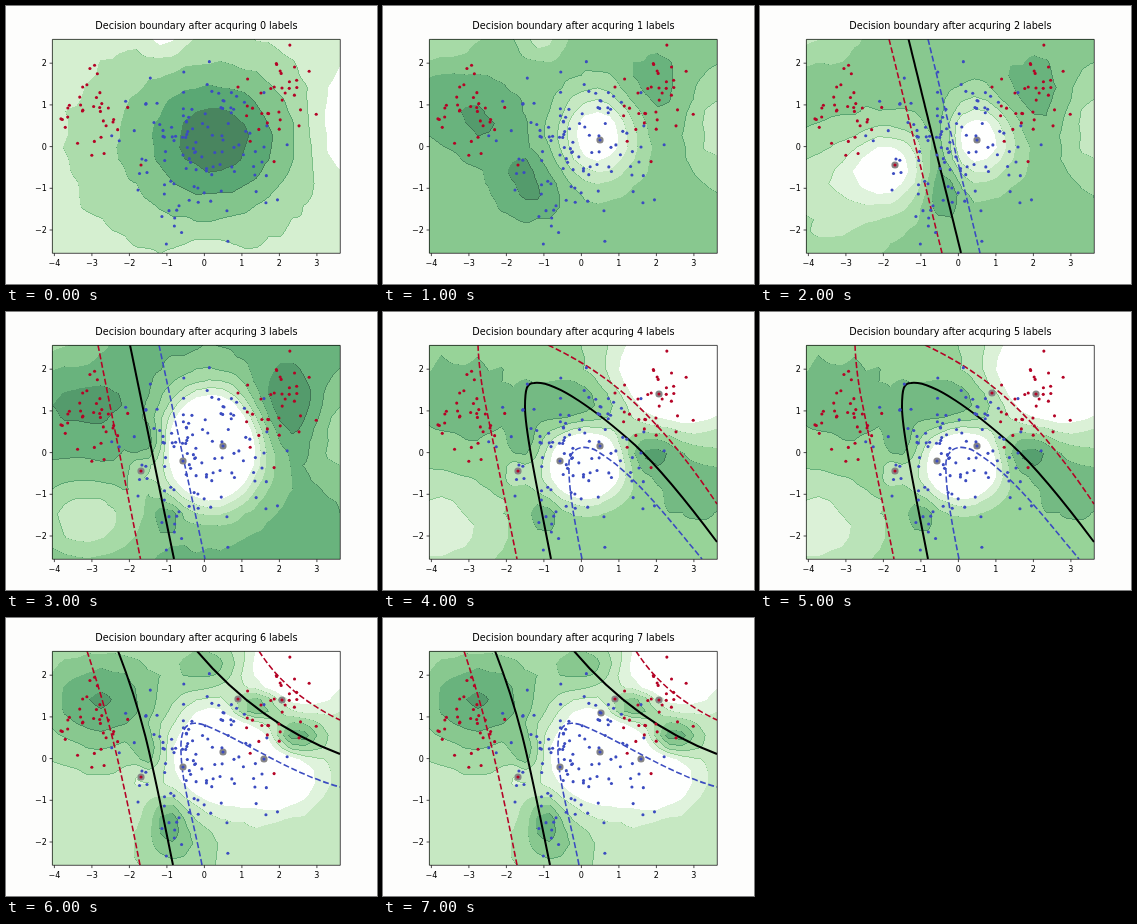
Recreate the animation shown at these times as an HTML page with a canvas. Size 371x278 px, loop 8 s.

```html
<!DOCTYPE html>
<html lang="en">
<head>
<meta charset="utf-8">
<title>Decision boundary</title>
<style>
html, body { margin: 0; width: 100%; height: 100%; overflow: hidden; background: #fdfdfc; }
canvas { position: absolute; left: 46px; top: 33px; }
svg { position: absolute; left: 0; top: 0; width: 371px; height: 278px; font: 8.05px "DejaVu Sans", sans-serif; }
</style>
</head>
<body>
<canvas id="density" width="288" height="214"></canvas>
<svg viewBox="0 0 371 278">
  <clipPath id="area"><path d="M46.4 33.4H334.3V247.3H46.4z"/></clipPath>
  <text id="title" x="190.4" y="23" font-size="9.66" text-anchor="middle"></text>
  <g clip-path="url(#area)">
    <g id="curves" fill="none" stroke-width="1.6"></g>
    <g id="rings" fill="#858585"></g>
    <g id="dots"></g>
  </g>
  <g id="axes"></g>
</svg>
<script>
const LEFT = 46, TOP = 33, WIDTH = 288, HEIGHT = 214, CELL = 12;
const RED = '#b40426', BLUE = '#3b4cc0';
const GREENS = [[254, 255, 254], [213, 239, 208], [151, 211, 152], [90, 168, 116], [64, 115, 84]];
const byId = id => document.getElementById(id);

function randomFrom(seed) {
  return () => {
    seed = seed + 0x6d2b79f5 | 0;
    let t = Math.imul(seed ^ seed >>> 15, 1 | seed);
    t = t + Math.imul(t ^ t >>> 7, 61 | t) ^ t;
    return ((t ^ t >>> 14) >>> 0) / 4294967296;
  };
}

// Each label: x, y, colour.
const labelled = [
  [217, 134, BLUE], [135, 159, RED], [177, 149, BLUE], [276, 82, RED],
  [232, 81, RED], [258, 141, BLUE], [218, 95, BLUE]
];

// Density is a base plus bumps of x, y, x radius, y radius, height, cut into equal bands.
const rightEdge = [334, 120, 28, 55, -.25];
const topNotch = [158, 33, 22, 18, -.25];
const topLeftCorner = [46, 33, 45, 22, -.2];
const line = (top, bottom) => `M${top} 33L${bottom} 247`;

const prior = {
  bands: 6, base: .05, curves: [],
  bumps: [rightEdge, topNotch, [212, 132, 68, 64, .43], [185, 138, 175, 150, .48], [200, 247, 25, 12, -.2]]
};
const oneLabel = {
  bands: 8, base: .56, curves: [],
  bumps: [rightEdge, topNotch, topLeftCorner, [214, 130, 37, 43, -.62], [75, 100, 45, 38, .17],
    [115, 128, 38, 38, .13], [147, 182, 34, 30, .22], [138, 160, 14, 13, .1], [268, 80, 32, 40, .13]]
};
const twoLabels = {
  bands: 8, base: .55, curves: [line(129, 182), line(148.5, 201), line(168, 220)],
  bumps: [rightEdge, topLeftCorner, [216, 134, 36, 38, -.6], [128, 160, 38, 36, -.45], [80, 175, 70, 45, -.25],
    [180, 155, 18, 50, .3], [186, 188, 16, 18, .12], [272, 85, 32, 40, .16], [60, 235, 60, 35, -.12]]
};
const threeLabels = {
  bands: 8, base: .67, curves: [line(92, 134.5), line(124, 168), line(153, 199)],
  bumps: [rightEdge, topLeftCorner, [205, 135, 46, 54, -1.4], [85, 92, 50, 28, .14], [144, 128, 16, 18, .25],
    [278, 92, 34, 40, .26], [135, 159, 9, 7, -.4], [80, 207, 58, 42, -.38], [160, 203, 13, 13, .25]]
};
const fiveLabels = {
  bands: 7, base: .52,
  bumps: [[78, 88, 50, 42, .13], [195, 90, 48, 24, .25], [202, 153, 35, 32, -1.1], [300, 58, 68, 55, -.95],
    [268, 140, 30, 20, .36], [315, 175, 35, 28, .18], [142, 130, 14, 22, .18], [135, 159, 9, 7, -.4],
    [160, 203, 13, 15, .22], [50, 215, 65, 50, -.33]],
  curves: [
    'M95 33Q96 58 101 85L134 247M165 33C222 60 270 96 334 192',
    'M168 247C157 190 142 120 142 95C142 76 144 71 151 71C172 68 215 100 252 133Q284 163 334 230',
    'M199 247C191 207 185 174 186 150C188 133 205 132 217 141C252 163 284 205 319 247'
  ]
};
const sevenLabels = {
  bands: 8, base: .32,
  bumps: [[95, 82, 65, 50, .45], [143, 135, 14, 20, .3], [162, 202, 15, 24, .3], [172, 222, 40, 40, .2],
    [205, 48, 35, 26, .3], [215, 135, 52, 50, -.6], [275, 160, 35, 28, -.45], [290, 50, 52, 42, -.5],
    [250, 88, 26, 16, .6], [290, 117, 24, 18, .55], [135, 159, 9, 7, -.3]],
  curves: [
    'M81 33C99 88 111 130 134 247M253 33Q280 76 334 102',
    'M112 33C139 103 146 145 167 247M191 33Q252 105 334 136',
    'M196 247C186 196 174 160 175 126C176 105 185 102 201 108C246 127 284 155 334 169'
  ]
};
const steps = [prior, oneLabel, twoLabels, threeLabels, fiveLabels, fiveLabels, sevenLabels, sevenLabels];

function green(amount) {
  const place = Math.min(amount, .999) * 4, i = Math.floor(place);
  return GREENS[i].map((c, k) => c + (GREENS[i + 1][k] - c) * (place - i));
}

// Samples the density on a coarse, slightly noisy grid and returns its bilinear interpolation.
function coarseField({ base, bumps }) {
  const random = randomFrom(5), nodes = [];
  for (let row = 0; row <= HEIGHT / CELL + 1; row++) {
    nodes.push([]);
    for (let col = 0; col <= WIDTH / CELL + 1; col++) {
      const x = LEFT + col * CELL, y = TOP + row * CELL;
      nodes[row].push(bumps.reduce((sum, [cx, cy, rx, ry, height]) =>
        sum + height * Math.exp(-(((x - cx) / rx) ** 2) - ((y - cy) / ry) ** 2),
        base + (random() - .5) * .035));
    }
  }
  return (x, y) => {
    const col = Math.floor(x / CELL), row = Math.floor(y / CELL);
    const u = x / CELL - col, v = y / CELL - row;
    const along = r => nodes[r][col] * (1 - u) + nodes[r][col + 1] * u;
    return along(row) * (1 - v) + along(row + 1) * v;
  };
}

function drawDensity(step) {
  const context = byId('density').getContext('2d');
  const image = context.createImageData(WIDTH, HEIGHT);
  const field = coarseField(step);
  const band = (x, y) => Math.max(0, Math.min(step.bands - 1, Math.floor(field(x, y) * step.bands)));
  const shades = Array.from({ length: step.bands }, (_, i) => i ? green((i + .5) / step.bands) : GREENS[0]);
  const edges = shades.map((_, i) => green((i + .5) / step.bands + .2));
  for (let y = 0; y < HEIGHT; y++) {
    for (let x = 0; x < WIDTH; x++) {
      const here = band(x, y);
      const onEdge = here > Math.min(band(x + 1, y), band(x, y + 1));
      image.data.set([...(onEdge && here > 1 ? edges : shades)[here], 255], (y * WIDTH + x) * 4);
    }
  }
  context.putImageData(image, 0, 0);
}

const circle = (x, y, r, fill) => `<circle cx="${x}" cy="${y}" r="${r}"${fill ? ` fill="${fill}"` : ''}/>`;

function cluster(seed, count, x, y, spreadX, spreadY, fill) {
  const random = randomFrom(seed);
  let dots = '';
  while (count--) {
    const distance = Math.sqrt(-2 * Math.log(1 - random() * .96)), angle = random() * 2 * Math.PI;
    dots += circle(x + spreadX * distance * Math.cos(angle), y + spreadY * distance * Math.sin(angle), 1.55, fill);
  }
  return dots;
}

function drawAxes() {
  const text = (n, x, y, anchor) =>
    `<text x="${x}" y="${y}" text-anchor="${anchor}">${String(n).replace('-', '\u2212')}</text>`;
  let marks = '', ticks = 'M46.4 33.4H334.3V247.3H46.4z';
  for (let n = -4; n <= 3; n++) {
    const x = 198.4 + 37.5 * n;
    ticks += `M${x} 247.3v2.8`;
    marks += text(n, x, 260, 'middle');
  }
  for (let n = -2; n <= 2; n++) {
    const y = 140.6 - 41.7 * n;
    ticks += `M46.4 ${y}h-2.8`;
    marks += text(n, 40.8, y + 3, 'end');
  }
  byId('axes').innerHTML = `<path d="${ticks}" fill="none" stroke="#000" stroke-width=".7"/>${marks}`;
}

function showStep(n) {
  const step = steps[n];
  byId('title').textContent = `Decision boundary after acquring ${n} labels`;
  drawDensity(step);
  byId('curves').innerHTML = step.curves.map((d, i) =>
    `<path d="${d}" stroke="${[RED, '#000', BLUE][i]}"${i === 1 ? ' stroke-width="2"' : ' stroke-dasharray="6 2.6"'}/>`).join('');
  byId('rings').innerHTML = labelled.slice(0, n).map(([x, y]) => circle(x, y, 3.6)).join('');
}

byId('dots').innerHTML =
  cluster(3, 112, 194, 145, 36, 42, BLUE) +
  cluster(8, 34, 83, 102, 23, 27, RED) +
  cluster(21, 34, 270, 93, 24, 27, RED) +
  labelled.map(([x, y, fill]) => circle(x, y, 1.55, fill)).join('');
drawAxes();

let current = -1;
function tick() {
  const n = Math.floor(performance.now() / 1000) % steps.length;
  if (n !== current) showStep(current = n);
  requestAnimationFrame(tick);
}
tick();
</script>
</body>
</html>
```
